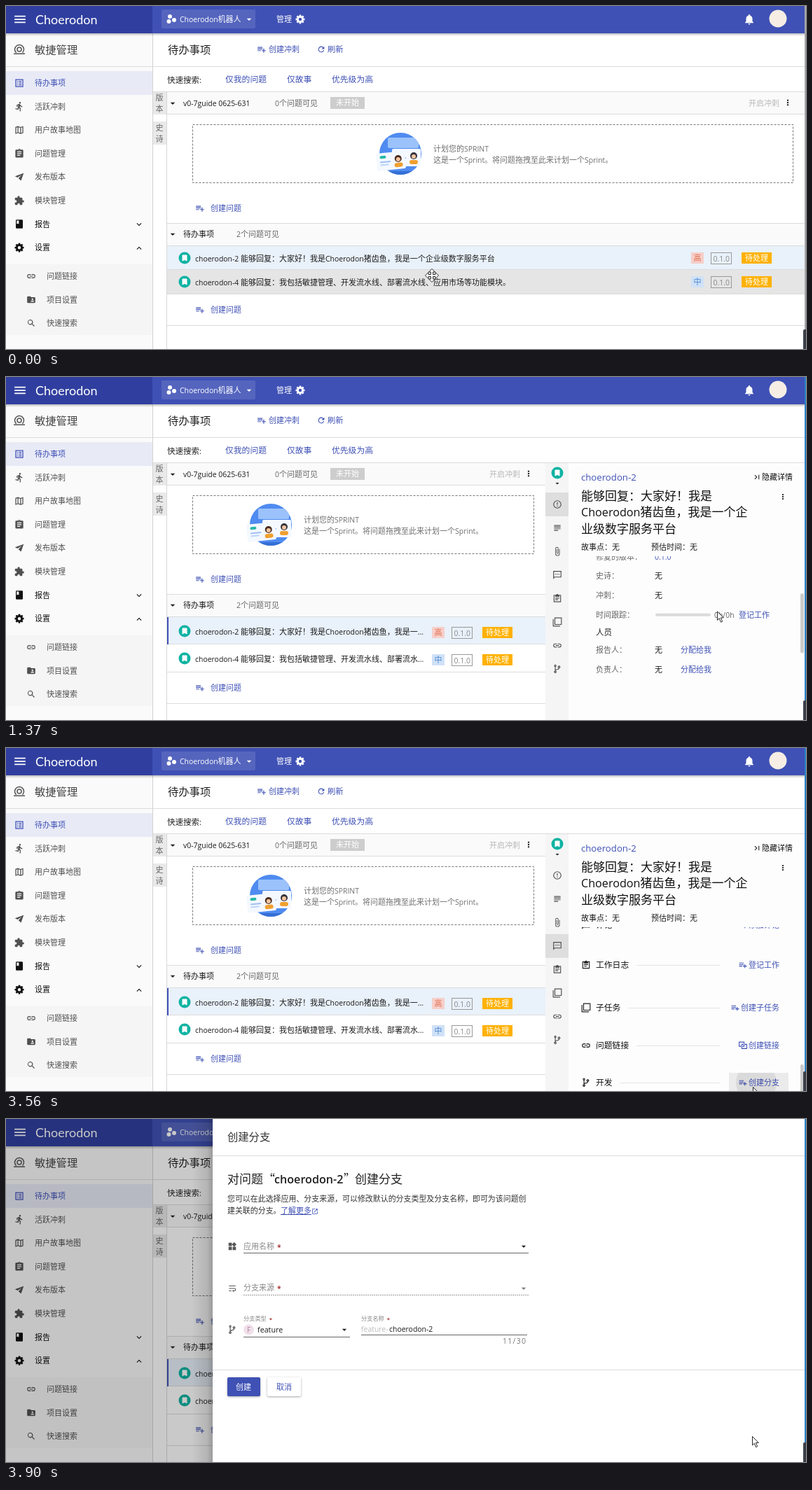
Write an HTML page with a canvas that moves like this. It is 1142 by 490 pixels and loops after 3.96 s.

```html
<!DOCTYPE html>
<html lang="zh">
<head>
<meta charset="utf-8">
<style>
html, body { margin: 0; width: 100%; height: 100%; overflow: hidden; background: #fff; }
canvas { display: block; }
</style>
</head>
<body>
<canvas id="stage" width="1142" height="490"></canvas>
<script>
const c = document.getElementById('stage').getContext('2d');
const LOOP = 3960;
const BLUE = '#3f51b5', INK = '#1c1c1c', GREY = '#666', PALE = '#b8b8b8', LINE = '#dcdcdc', TEAL = '#0fb3a2';

// 24-unit icon shapes
const ICON = {
  menu: 'M3 18h18v-2H3zm0-5h18v-2H3zm0-7v2h18V6z',
  bell: 'M12 22c1.1 0 2-.9 2-2h-4c0 1.1.9 2 2 2zm6-6v-5c0-3-1.6-5.6-4.5-6.3V4a1.5 1.5 0 0 0-3 0v.7C7.6 5.4 6 7.9 6 11v5l-2 2v1h16v-1z',
  list: 'M3 3h18v18H3zm2 2v14h14V5zm6 2h6v2h-6zm0 4h6v2h-6zm0 4h6v2h-6zM7 7h2v2H7zm0 4h2v2H7zm0 4h2v2H7z',
  run: 'M13.5 5.5a2 2 0 1 0 0-4 2 2 0 0 0 0 4zm-3.6 13.9l1-4.4 2.1 2v6h2v-7.5l-2.1-2 .6-3c1.3 1.5 3.3 2.5 5.5 2.5v-2c-1.9 0-3.5-1-4.3-2.4l-1-1.6c-.4-.6-1-1-1.7-1L6 8.3V13h2V9.6l1.8-.7-1.6 8.1-4.9-1-.4 2z',
  map: 'M21 3l-6 2.1L9 3 3 5v16l6-2.1 6 2.1 6-2zM10 5.5l4 1.4v11.6l-4-1.4zm-5 1l3-1v11.7l-3 1.1zm14 11l-3 1V6.9l3-1.2z',
  task: 'M19 3h-4.2a3 3 0 0 0-5.6 0H5a2 2 0 0 0-2 2v14a2 2 0 0 0 2 2h14a2 2 0 0 0 2-2V5a2 2 0 0 0-2-2zm-7 0a1 1 0 1 1 0 2 1 1 0 0 1 0-2zm2 14H7v-2h7zm3-4H7v-2h10zm0-4H7V7h10z',
  board: 'M19 3h-4.2a3 3 0 0 0-5.6 0H3v18h18V3zM5 5h2v3h10V5h2v14H5zm2 5h10v2H7zm0 4h7v2H7z',
  plane: 'M22 3L2 10l6 3 9-6-7 8 6 5z',
  piece: 'M20.5 11H19V7a2 2 0 0 0-2-2h-4V3.5a2.5 2.5 0 0 0-5 0V5H4a2 2 0 0 0-2 2v3.8h1.5a2.7 2.7 0 0 1 0 5.4H2V20a2 2 0 0 0 2 2h3.8v-1.5a2.7 2.7 0 0 1 5.4 0V22H17a2 2 0 0 0 2-2v-4h1.5a2.5 2.5 0 0 0 0-5z',
  book: 'M18 2H6a2 2 0 0 0-2 2v16a2 2 0 0 0 2 2h12a2 2 0 0 0 2-2V4a2 2 0 0 0-2-2zM6 4h5v8l-2.5-1.5L6 12z',
  link: 'M3.9 12A3.1 3.1 0 0 1 7 8.9h4V7H7a5 5 0 0 0 0 10h4v-1.9H7A3.1 3.1 0 0 1 3.9 12zM8 13h8v-2H8zm9-6h-4v1.9h4a3.1 3.1 0 0 1 0 6.2h-4V17h4a5 5 0 0 0 0-10z',
  folder: 'M10 4H4a2 2 0 0 0-2 2v12a2 2 0 0 0 2 2h16a2 2 0 0 0 2-2V8a2 2 0 0 0-2-2h-8zm5 5a2 2 0 1 1 0 4 2 2 0 0 1 0-4zm4 8h-8v-1c0-1.3 2.7-2 4-2s4 .7 4 2z',
  search: 'M15.5 14h-.8A6.5 6.5 0 1 0 14 14.7v.8l5 5 1.5-1.5zm-6 0a4.5 4.5 0 1 1 0-9 4.5 4.5 0 0 1 0 9z',
  add: 'M14 10H2v2h12zm0-4H2v2h12zm4 8v-4h-2v4h-4v2h4v4h2v-4h4v-2zM2 16h8v-2H2z',
  reload: 'M17.7 6.3A8 8 0 1 0 19.7 14h-2A6 6 0 1 1 16.2 7.8L13 11h7V4z',
  caret: 'M7 10l5 5 5-5z',
  down: 'M16.6 8.6L12 13.2 7.4 8.6 6 10l6 6 6-6z',
  up: 'M7.4 15.4L12 10.8l4.6 4.6L18 14l-6-6-6 6z',
  dots: 'M10 4h4v4h-4zm0 6h4v4h-4zm0 6h4v4h-4z',
  mark: 'M17 3H7a2 2 0 0 0-2 2v16l7-3 7 3V5a2 2 0 0 0-2-2z',
  info: 'M11 15h2v2h-2zm0-8h2v6h-2zM12 2a10 10 0 1 0 0 20 10 10 0 0 0 0-20zm0 18a8 8 0 1 1 0-16 8 8 0 0 1 0 16z',
  lines: 'M14 17H4v2h10zm6-8H4v2h16zM4 15h16v-2H4zM4 5v2h16V5z',
  clip: 'M16.5 6v11.5a4 4 0 0 1-8 0V5a2.5 2.5 0 0 1 5 0v10.5a1 1 0 0 1-2 0V6H10v9.5a2.5 2.5 0 0 0 5 0V5a4 4 0 0 0-8 0v12.5a5.5 5.5 0 0 0 11 0V6z',
  chat: 'M22 2H2v20l4-4h16zm-2 14H5l-1 1V4h16zM7 9h2v2H7zm4 0h2v2h-2zm4 0h2v2h-2z',
  copy: 'M3 5H1v18h18v-2H3zM23 1H5v18h18zm-2 16H7V3h14z',
  branch: 'M7 1a3 3 0 0 1 1 5.8v6.5c1-.8 2.2-1 4-1.3 2-.4 3-1 3.2-2.3a3 3 0 1 1 2.1 0c-.3 2.6-2 3.8-5 4.3-2.5.5-3.8 1-4.3 2.2a3 3 0 1 1-2 0V6.8A3 3 0 0 1 7 1zm0 2a1 1 0 1 0 0 2 1 1 0 0 0 0-2zm9 3a1 1 0 1 0 0 2 1 1 0 0 0 0-2zM7 18a1 1 0 1 0 0 2 1 1 0 0 0 0-2z',
  last: 'M5.6 7.4L10.2 12l-4.6 4.6L7 18l6-6-6-6zM16 6h2v12h-2z',
  full: 'M15 3l2.3 2.3-2.9 2.9 1.4 1.4 2.9-2.9L21 9V3zM3 9l2.3-2.3 2.9 2.9 1.4-1.4-2.9-2.9L9 3H3zm6 12l-2.3-2.3 2.9-2.9-1.4-1.4-2.9 2.9L3 15v6zm12-6l-2.3 2.3-2.9-2.9-1.4 1.4 2.9 2.9L15 21h6z',
  pen: 'M3 17.2V21h3.8L17.8 9.9l-3.7-3.7zM20.7 7a1 1 0 0 0 0-1.4l-2.3-2.3a1 1 0 0 0-1.4 0l-1.9 1.8 3.8 3.8z',
  upload: 'M9 16h6v-6h4l-7-7-7 7h4zm-4 2h14v3H5z',
  widgets: 'M13 13v8h8v-8zM3 21h8v-8H3zM3 3v8h8V3zm13.7-1.3L11 7.3l5.7 5.7 5.6-5.7z',
  wrap: 'M4 19h6v-2H4zM20 5H4v2h16zm-3 6H4v2h13.2a2 2 0 0 1 0 4H15v-2l-3 3 3 3v-2h2a4 4 0 0 0 0-8z',
  open: 'M19 19H5V5h7V3H3v18h18v-9h-2zM14 3v2h3.6l-9.8 9.8 1.4 1.4L19 6.4V10h2V3z',
  pair: 'M1 2h15v13H1zm2 2v9h11V4zM8 8h15v13H8zm2 2v9h11v-9z'
};
for (const k in ICON) ICON[k] = new Path2D(ICON[k]);

function icon(name, x, y, size, color) {
  c.save();
  c.translate(x - size / 2, y - size / 2);
  c.scale(size / 24, size / 24);
  c.fillStyle = color;
  c.fill(ICON[name], 'evenodd');
  c.restore();
}
function box(x, y, w, h, color) { c.fillStyle = color; c.fillRect(x, y, w, h); }
function disc(x, y, r, color) { c.fillStyle = color; c.beginPath(); c.arc(x, y, r, 0, 7); c.fill(); }
function round(x, y, w, h, r, color) { c.fillStyle = color; c.beginPath(); c.roundRect(x, y, w, h, r); c.fill(); }
function fade(x0, y0, x1, y1, from, to) {
  const g = c.createLinearGradient(x0, y0, x1, y1);
  g.addColorStop(0, `rgba(0,0,0,${from})`);
  g.addColorStop(1, `rgba(0,0,0,${to})`);
  return g;
}

// Latin runs are set slightly smaller than the Chinese around them
function text(s, x, y, size = 11, color = INK, weight = 400) {
  c.fillStyle = color;
  for (const run of s.match(/[\x20-\xff]+|[^\x20-\xff]+/g)) {
    c.font = run.charCodeAt(0) < 256
      ? `${weight} ${size * .95}px "Open Sans", sans-serif`
      : `${weight} ${size}px "Noto Sans CJK SC", "Noto Sans CJK", sans-serif`;
    c.fillText(run, x, y + size * .37);
    x += c.measureText(run).width;
  }
  return x;
}
function key(t, pts) {
  if (t <= pts[0][0]) return pts[0][1];
  for (let i = 1; i < pts.length; i++) {
    const [a, u] = pts[i - 1], [b, v] = pts[i];
    if (t <= b) return u + (v - u) * (t - a) / (b - a);
  }
  return pts[pts.length - 1][1];
}
function gear(x, y, r, color) {
  c.strokeStyle = color;
  c.lineWidth = r * .45;
  c.beginPath(); c.arc(x, y, r * .56, 0, 7); c.stroke();
  c.lineWidth = r * .4;
  for (let i = 0; i < 8; i++) {
    const a = i * Math.PI / 4;
    c.beginPath();
    c.moveTo(x + Math.cos(a) * r * .6, y + Math.sin(a) * r * .6);
    c.lineTo(x + Math.cos(a) * r, y + Math.sin(a) * r);
    c.stroke();
  }
}

function topBar() {
  box(0, 0, 1140, 39, BLUE);
  box(0, 0, 209, 39, '#303f9f');
  box(0, 39, 1140, 4, fade(0, 39, 0, 43, .25, 0));
  icon('menu', 20, 19, 21, '#fff');
  c.fillStyle = '#fff';
  c.font = '18px Lato, sans-serif';
  c.fillText('Choerodon', 42, 26);
  round(222, 5, 134, 27, 2, '#5565be');
  disc(234, 15, 3, '#fff'); disc(232.5, 22, 3, '#fff'); disc(240, 20, 3, '#fff');
  text('Choerodon机器人', 248, 19, 11, '#fff');
  icon('caret', 347, 19, 16, '#fff');
  text('管理', 386, 19, 11, '#fff', 500);
  gear(420, 19, 6.5, '#fff');
  icon('bell', 1061, 19, 18, '#fff');
  disc(1102, 18, 12.5, '#f6eee4');
}

const MENU = [['list', '待办事项'], ['run', '活跃冲刺'], ['map', '用户故事地图'], ['task', '问题管理'],
  ['plane', '发布版本'], ['piece', '模块管理'], ['book', '报告'], ['', '设置']];
const SUBMENU = [['link', '问题链接'], ['folder', '项目设置'], ['search', '快速搜索']];

function sideBar() {
  box(0, 39, 209, 451, '#fafafa');
  c.strokeStyle = '#555';
  c.lineWidth = 1.5;
  c.beginPath(); c.arc(19, 62, 6.5, 2.3, 7.1); c.stroke();
  c.beginPath(); c.arc(19, 62, 3, 0, 7); c.stroke();
  box(11, 67.5, 16, 1.5, '#555');
  text('敏捷管理', 41, 62, 15.3, '#444');
  box(0, 86, 209, 1, LINE);
  box(0, 93, 209, 34, '#e8eaf6');
  box(0, 369, 209, 101, '#f5f5f5');
  MENU.forEach(([name, label], i) => {
    const y = 110 + i * 33.6, col = i == 0 ? BLUE : i > 5 ? '#111' : '#505050';
    if (name) icon(name, 19, y, 15, col); else gear(19, y, 6.5, col);
    text(label, 41, y, 11, col, i > 5 ? 500 : 400);
  });
  icon('down', 190, 312, 14, '#111');
  icon('up', 190, 346, 14, '#111');
  SUBMENU.forEach(([name, label], i) => {
    icon(name, 36, 386 + i * 33.5, 14, '#505050');
    text(label, 58, 386 + i * 33.5, 11, '#505050');
  });
  box(209, 39, 1, 451, '#d2d2d2');
}

function pageHead() {
  text('待办事项', 231, 62, 15.3, '#222');
  icon('add', 365, 62, 14, BLUE);
  text('创建冲刺', 375, 62, 11, BLUE);
  icon('reload', 450, 62, 13, BLUE);
  text('刷新', 459, 62, 11.2, BLUE);
  box(210, 86, 930, 1, LINE);
  text('快速搜索:', 230, 106, 11.5, '#222', 500);
  text('仅我的问题', 313, 105, 11.8, BLUE);
  text('仅故事', 401, 105, 11.8, BLUE);
  text('优先级为高', 465, 105, 11.8, BLUE);
  box(210, 122, 930, 1, LINE);
  box(210, 123, 19, 32, '#e9e9e9');
  box(210, 165, 19, 33, '#e9e9e9');
  [...'版本史诗'].forEach((s, i) => text(s, 213.5, [131, 147, 174, 190][i], 11, GREY));
  box(229, 122, 1, 368, '#d8d8d8');
}

function card(x, y, turn, hair) {
  c.save();
  c.translate(x, y);
  c.rotate(turn);
  round(-20, -12, 41, 25, 2, '#f4f8ff');
  round(-15, -8, 9, 4, 2, '#28b8a8');
  box(-15, 0, 15, 2, '#9fc0f5');
  box(-15, 4, 12, 2, '#bcd4fa');
  disc(11, -2, 5, hair);
  disc(11, -1, 3, '#f5c5a0');
  round(5, 4, 12, 6, 3, '#f0a030');
  c.restore();
}
function picture(x) {
  c.save();
  c.beginPath(); c.arc(x, 211, 30, 0, 7); c.clip();
  box(x - 30, 181, 60, 60, '#4f8bf0');
  round(x - 18, 188, 44, 15, 2, '#9cc2fb');
  box(x - 30, 236, 60, 5, '#356fd6');
  c.restore();
  card(x + 8, 216, 0, '#34343c');
  card(x - 14, 221, -.1, '#4a2c20');
}

function storyRow(y, h, level, label, edge, open) {
  const mid = open ? y + 20 : y + 17, chip = open ? y + 22 : y + 17, x = edge - 1140;
  disc(255, mid, 8.5, TEAL);
  icon('mark', 255, mid, 12, '#fff');
  text(label, 270, mid + 1, 11, INK);
  const high = level == '高';
  box(978 + x, chip - 8, 18, 16, high ? '#f6cfca' : '#cfe1f7');
  text(level, 981.5 + x, chip, 11, high ? '#e06a4c' : '#4a86cf');
  c.strokeStyle = '#999';
  c.lineWidth = 1;
  c.strokeRect(1006.5 + x, chip - 7.5, 29, 16);
  text('0.1.0', 1009.5 + x, chip + 1, 11, '#888');
  box(1050 + x, chip - 8, 43, 16, '#ffb100');
  text('待处理', 1055 + x, chip, 11, '#fff', 500);
  box(230, y + h, edge - 230, 1, LINE);
}

function backlog(t, open) {
  const edge = open ? 770 : 1140, x = edge - 1140, half = x / 2;
  box(230, 123, edge - 230, 32, '#fafafa');
  box(230, 154, edge - 230, 1, LINE);
  icon('caret', 238, 139, 16, '#222');
  text('v0-7guide 0625-631', 253, 139);
  text('0个问题可见', 384, 139, 11, GREY);
  box(463, 130, 49, 17, '#cdcdcd');
  text('未开始', 471, 138, 11, '#fff');
  text('开启冲刺', 1060 + x, 139, 11, PALE);
  icon('dots', 1116 + x, 138, 13, '#222');
  c.setLineDash([3, 2]);
  c.strokeStyle = '#777';
  c.lineWidth = 1;
  c.strokeRect(266.5, 169.5, edge - 283, 83);
  c.setLineDash([]);
  picture(563 + half);
  text('计划您的SPRINT', 610 + half, 204, 11, '#707070');
  text('这是一个Sprint。将问题拖拽至此来计划一个Sprint。', 610 + half, 220, 11, '#707070');
  icon('add', 277, 289, 14, BLUE);
  text('创建问题', 292, 289, 11, BLUE);

  box(230, 310, edge - 230, 33, '#fafafa');
  box(230, 310, edge - 230, 1, LINE);
  icon('caret', 238, 326, 16, '#222');
  text('待办事项', 253, 326);
  text('2个问题可见', 329, 326, 11, GREY);
  const h = open ? 39 : 34, y2 = 343 + h;
  box(230, 342, edge - 230, 1, LINE);
  box(230, 343, edge - 230, h, '#e9f1fa');
  if (!open) box(230, y2, 910, h, `rgba(0,0,0,${key(t, [[0, .1], [290, 0]])})`);
  storyRow(343, h - 1, '高', 'choerodon-2 能够回复：大家好！我是Choerodon猪齿鱼，我是一' + (open ? '...' : '个企业级数字服务平台'), edge, open);
  storyRow(y2, h, '中', 'choerodon-4 能够回复：我包括敏捷管理、开发流水线、部署流水' + (open ? '...' : '线、应用市场等功能模块。'), edge, open);
  if (open) box(230, 343, 2, 39, BLUE);
  const y = open ? 444 : 434;
  icon('add', 277, y, 14, BLUE);
  text('创建问题', 292, y, 11, BLUE);
  box(230, y + 22, edge - 230, 1, LINE);
}

const FIELDS = ['状态', '优先级', '模块', '标签', '修复的版本', '史诗', '冲刺', '时间跟踪'];
const TABS = ['info', 'lines', 'clip', 'chat', 'board', 'copy', 'link', 'branch'];
// icon, title, place, link icon, link label
const SECTIONS = [
  ['lines', '描述', 716, 'full', '全屏编辑'], ['clip', '附件', 817, 'upload', '上传附件'],
  ['chat', '评论', 874, 'add', '添加评论'], ['board', '工作日志', 931, 'add', '登记工作'],
  ['copy', '子任务', 992, 'add', '创建子任务'], ['link', '问题链接', 1046, 'pair', '创建链接'],
  ['branch', '开发', 1099, 'add', '创建分支']];

function section([mark, title, , linkMark, label], y, hover) {
  icon(mark, 828, y, 14, '#222');
  const end = text(title, 842, y, 11.8, '#111');
  box(end + 11, Math.round(y), 1020 - end - 11, 1, '#e4e4e4');
  if (hover) box(1032, y - 14, 85, 27, '#ebebeb');
  const x = 1104 - label.length * 11;
  icon(linkMark, x - 8, y, 13, BLUE);
  text(label, x, y, 11, BLUE);
}

function details(y0, loaded) {
  icon('info', 828, y0, 15, '#444');
  text('详情', 842, y0, 12, '#333');
  box(877, y0, 143, 1, '#e4e4e4');
  FIELDS.forEach((f, i) => {
    const y = y0 + 34 + i * 27.7, blue = i == 2 || i == 4;
    text(f + '：', 842, y, 11, GREY);
    if (i == 7) return;
    if (loaded && i == 0) {
      box(926, y - 8, 43, 16, '#ffb100');
      text('待处理', 931, y, 11, '#fff', 500);
    } else text(loaded && i == 1 ? '高' : loaded && i == 4 ? '0.1.0' : '无', 926, y, 11, blue ? BLUE : INK);
  });
  round(927, y0 + 226, 79, 4, 2, '#dadada');
  text('0h/0h', 1011, y0 + 228, 11, GREY);
  text('登记工作', 1046, y0 + 228, 11, BLUE);
  text('人员', 842, y0 + 253, 11.5, '#222');
  ['报告人', '负责人'].forEach((s, i) => {
    text(s + '：', 842, y0 + 278 + i * 28, 11, GREY);
    text('无', 926, y0 + 278 + i * 28);
    text('分配给我', 963, y0 + 278 + i * 28, 11, BLUE);
  });
}

function panel(t) {
  const loaded = t >= 920, scroll = key(t, [[1160, 0], [1680, 413], [1830, 413], [2220, 621]]);
  const top = loaded ? 256 : 192, tab = t < 2000 ? 0 : 3;
  box(770, 123, 370, 367, '#fdfdfd');
  box(770, 123, 33, 367, '#f5f5f5');
  disc(787, 137, 8.5, TEAL);
  icon('mark', 787, 137, 12, '#fff');
  icon('caret', 787, 152, 12, '#222');
  box(770, 165 + tab * 33.6, 33, 34, '#dedede');
  TABS.forEach((s, i) => icon(s, 787, 182 + i * 33.6, 14, '#505050'));
  icon('last', 1072, 143, 13, '#222');
  text('隐藏详情', 1079, 143, 11, '#111');
  icon('dots', 1109, 171, 12, '#333');
  if (loaded) {
    text('choerodon-2', 821, 143, 13.9, BLUE);
    text('能够回复：大家好！我是', 821, 170, 17, '#111');
    text('Choerodon猪齿鱼，我是一个企', 821, 193, 17, '#111');
    text('业级数字服务平台', 821, 217, 17, '#111');
    text('故事点：无', 821, 243);
    text('预估时间：无', 921, 243);
  }
  c.save();
  c.beginPath(); c.rect(803, top, 337, 490 - top); c.clip();
  details((loaded ? 276 : 210) - scroll, loaded);
  if (loaded) {
    SECTIONS.forEach((s, i) => {
      const hover = i == 5 ? t >= 2330 && t < 2620 : i == 6 && t >= 2950;
      section(s, s[2] - scroll, hover);
    });
    icon('pen', 1123, 717 - scroll, 14, '#222');
    text('能够回复：大家好！我是Choerodon猪齿鱼，我是一个企', 842, 750 - scroll);
    text('业级数字服务平台', 842, 766 - scroll);
    if (t >= 3490 && t < 3650) {
      c.beginPath(); c.rect(1032, 464, 85, 26); c.clip();
      disc(1071, 478, key(t, [[3490, 12], [3560, 29]]), 'rgba(0,0,0,.07)');
    }
  }
  c.restore();
  if (loaded) round(1134, 258 + scroll * 129 / 413, 5, 85, 2, '#ccc');
  else round(1134, 192, 5, 113, 2, '#ccc');
  const veil = key(t, [[650, .72], [760, .58], [830, .58], [920, .3], [1000, 0]]);
  if (veil) box(770, 123, 370, 367, `rgba(253,253,253,${veil})`);
  if (!loaded) {
    disc(955, 331, 12.5, '#dcdcdc');
    c.save();
    c.translate(955, 331);
    c.rotate((t - 760) / 160);
    box(-.5, -12, 1, 3, '#777');
    c.restore();
  }
}

function field(label, x, y, size) {
  const end = text(label, x, y, size, '#888');
  text('*', end + 4, y + 1, size, '#a02020', 600);
}

function drawer(t) {
  box(0, 0, 1140, 490, `rgba(0,0,0,${key(t, [[3650, .09], [3750, .15], [3830, .19], [3900, .21]])})`);
  c.save();
  c.globalAlpha = key(t, [[3650, .87], [3750, .96], [3830, 1]]);
  // the sheet grows leftwards from the right edge
  c.translate(1140, 0);
  c.scale(key(t, [[3650, .968], [3750, .99], [3830, .998], [3900, 1]]), 1);
  c.translate(-1140, 0);
  box(265, 0, 30, 490, fade(265, 0, 295, 0, 0, .14));
  box(287, 0, 8, 490, fade(287, 0, 295, 0, 0, .1));
  box(295, 0, 845, 490, '#fff');
  text('创建分支', 316, 25, 15.3, '#333');
  box(295, 52, 845, 1, LINE);
  text('对问题“', 316, 86, 17, '#222');
  text('choerodon-2', 383, 86, 17, '#222', 600);
  text('”', 482, 86, 17, '#222');
  text('创建分支', 498, 86, 17, '#222');
  text('您可以在此选择应用、分支来源，可以修改默认的分支类型及分支名称，即可为该问题创', 316, 114, 10.95, '#333');
  text('建关联的分支。', 316, 131, 10.95, '#333');
  text('了解更多', 392, 131, 11, BLUE);
  box(392, 136, 44, 1, BLUE);
  icon('open', 441, 132, 10, BLUE);

  icon('widgets', 323, 182, 14, '#555');
  field('应用名称', 339, 182, 11);
  box(339, 191, 407, 1, '#666');
  icon('caret', 739, 182, 15, '#222');
  icon('wrap', 323, 242, 14, '#555');
  field('分支来源', 339, 241, 11);
  for (let x = 339; x < 746; x += 3) box(x, 251, 2, 1, '#999');
  icon('caret', 739, 242, 15, '#777');

  icon('branch', 323, 301, 14, '#555');
  field('分支类型', 339, 285, 8.2);
  disc(346.5, 301, 7.5, '#f0e0ea');
  text('F', 344, 301, 10.5, '#b08aa0');
  text('feature', 359, 301, 11.3);
  icon('caret', 483, 301, 15, '#222');
  box(339, 311, 152, 1, '#666');
  field('分支名称', 507, 285, 8.2);
  text('feature-', 507, 300, 11, '#bbb');
  text('choerodon-2', 547, 300, 11);
  box(507, 308, 237, 1, '#666');
  c.letterSpacing = '1.3px';
  text('11/30', 709, 317, 11, '#777');
  c.letterSpacing = '0px';

  box(295, 358, 845, 1, LINE);
  c.shadowColor = 'rgba(0,0,0,.35)';
  c.shadowBlur = 3;
  c.shadowOffsetY = 1;
  round(316, 369, 47, 27, 2, BLUE);
  round(373, 369, 48, 27, 2, '#fff');
  c.shadowColor = 'transparent';
  text('创建', 328, 383, 11, '#fff', 500);
  text('取消', 386, 383, 11, BLUE);
  c.restore();
}

function outline(pts) {
  c.beginPath();
  for (const [x, y] of pts) c.lineTo(x, y);
  c.closePath();
  c.fillStyle = '#fff';
  c.strokeStyle = '#111';
  c.fill();
  c.stroke();
}
const ARM = [[-1.5, -1.5], [-1.5, -5], [-4.5, -5], [0, -9.5], [4.5, -5], [1.5, -5]];
const CROSS = [0, 1, 2, 3].flatMap(i => ARM.map(([x, y]) => {
  for (let n = 0; n < i; n++) [x, y] = [-y, x];
  return [x, y];
}));
const ARROW = [[.5, .5], [.5, 13], [3.3, 10.3], [5.5, 15.8], [7.7, 14.8], [5.4, 9.6], [9.3, 9.5]];
// time, x, y
const PATH = [[0, 608, 385], [290, 584.5, 366], [920, 584.5, 366], [1160, 1005, 332], [1680, 1030, 338],
  [1830, 1030, 338], [1920, 1032, 346], [2220, 1070, 416], [2450, 1095, 443], [2530, 1095, 443],
  [3110, 1072, 474], [3320, 1066, 484], [3560, 1066, 484], [3650, 1068, 481], [3750, 1068, 476], [3900, 1065, 453]];

function pointer(t) {
  c.save();
  c.translate(key(t, PATH.map(p => [p[0], p[1]])), key(t, PATH.map(p => [p[0], p[2]])));
  c.lineWidth = .9;
  outline(t < 1000 ? CROSS : ARROW);
  c.restore();
}

// start, end and number of even steps in each burst of movement
const BURSTS = [[60, 290, 4], [470, 470, 1], [650, 650, 1], [760, 830, 2], [920, 1160, 4], [1210, 1680, 7],
  [1750, 1830, 2], [1920, 2220, 5], [2330, 2450, 3], [2620, 3110, 7], [3190, 3320, 2], [3490, 3560, 2],
  [3650, 3750, 2], [3830, 3900, 2]];
function held(t) {
  let last = 0;
  for (const [a, b, n] of BURSTS) {
    for (let i = 0; i < n; i++) {
      const s = n > 1 ? a + (b - a) * i / (n - 1) : a;
      if (s <= t + .01) last = s;
    }
  }
  return last;
}

function draw(t) {
  const open = t >= 650;
  box(0, 0, 1142, 490, '#fff');
  sideBar();
  pageHead();
  topBar();
  backlog(t, open);
  if (open) panel(t);
  if (t >= 3650) drawer(t);
  box(1140, 0, 2, 490, t < 470 ? '#a8a8a8' : '#2b83c8');
  round(1138, 462, 6, 32, 2, '#3b3f48');
  pointer(t);
}

function tick(now) {
  draw(held(now % LOOP));
  requestAnimationFrame(tick);
}
draw(0);
requestAnimationFrame(tick);
</script>
</body>
</html>
```
